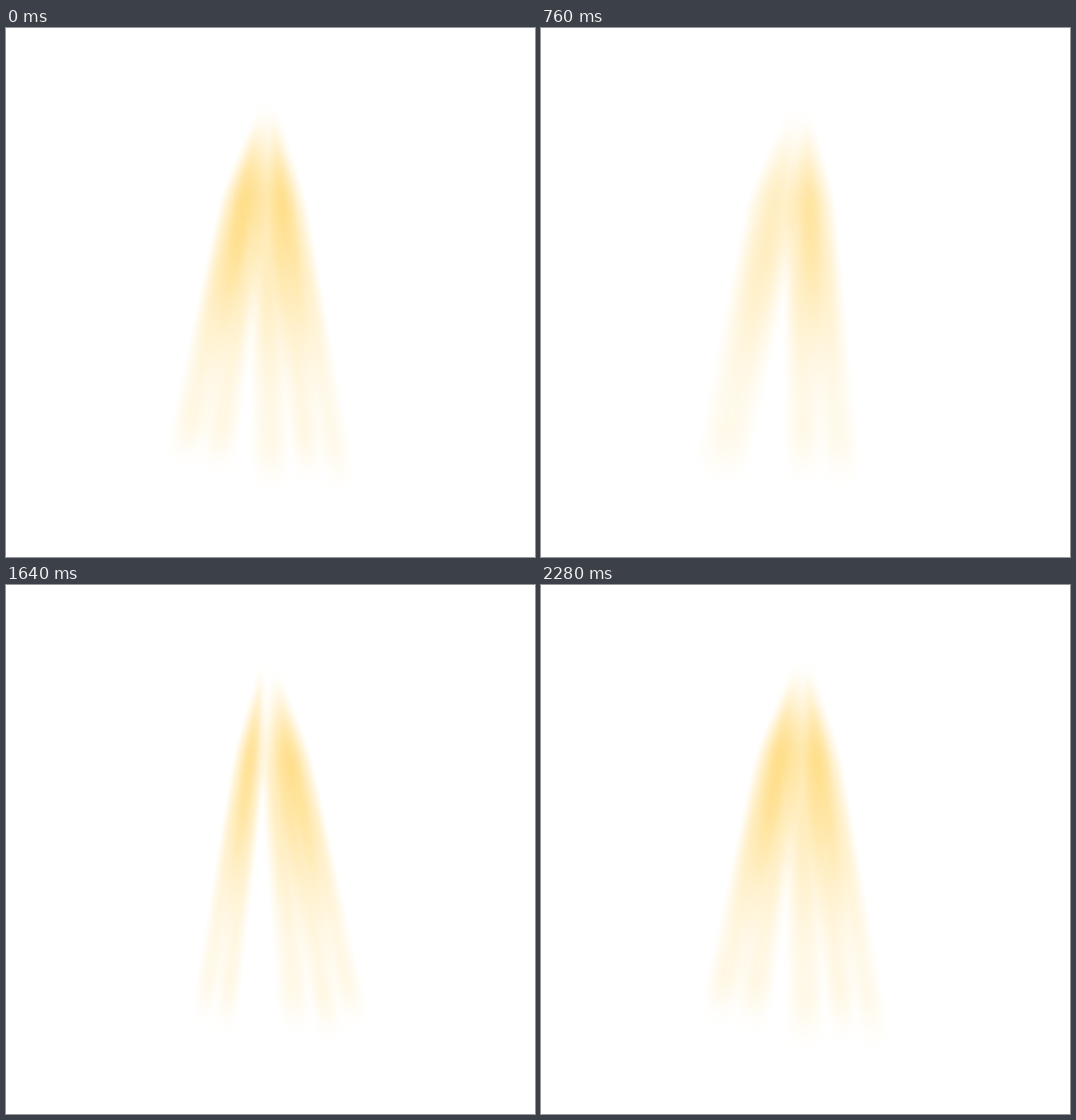
Animation of 748x748 px, one loop 2.32 s. Source, as an HTML page with a canvas:

```html
<!DOCTYPE html>
<html lang="en">
<head>
<meta charset="utf-8">
<title>Light rays</title>
<style>
html, body { margin: 0; width: 100%; height: 100%; overflow: hidden; background: #fff; }
canvas { display: block; width: 100vw; height: 100vh; }
</style>
</head>
<body>
<canvas id="stage" width="748" height="748"></canvas>
<script>
const ctx = document.getElementById('stage').getContext('2d');
const SIZE = 748, STEP = 40, LOOP = 2320, CYCLE = LOOP - STEP;
const APEX = { x: 370, y: 60 }, BASE = 600, DRIFT = 45;

const clamp = (v, lo, hi) => Math.min(hi, Math.max(lo, v));
const smooth = v => { v = clamp(v, 0, 1); return v * v * (3 - 2 * v); };
const noise = n => { const v = Math.sin(n * 12.9898) * 43758.5453; return v - Math.floor(v); };

// A fan is set by where its rays cross the base line; spacing gives their widths
function makeFan(at, ...bases) {
  const rays = bases.map((base, i) => {
    const gap = Math.min(...bases.filter((_, j) => j !== i).map(b => Math.abs(b - base)));
    return {
      slope: (base - APEX.x) / (BASE - APEX.y),
      width: clamp(gap * 1.2, 38, 84),
      top: 95 + 25 * noise(base),
      end: 625 + 45 * noise(base + 1),
      alpha: .32 + .12 * noise(base + 2)
    };
  });
  return { at, rays };
}

const fans = [
  makeFan(0, 252, 300, 374, 425, 465),
  makeFan(440, 324, 367, 418, 488),
  makeFan(760, 259, 372, 422),
  makeFan(1160, 262, 345, 383, 452),
  makeFan(1640, 280, 312, 408, 452, 490),
  makeFan(2040, 255, 300, 372, 430, 490)
];

// Soft streak: narrow at the top, bright upper body, faint long tail
function makeStreak(w, h) {
  const tile = document.createElement('canvas');
  tile.width = w;
  tile.height = h;
  const c = tile.getContext('2d'), img = c.createImageData(w, h);
  for (let y = 0, i = 0; y < h; y++) {
    const v = (y + .5) / h;
    const half = .35 + .65 * smooth(v / .3);
    const tail = 1 - .65 * smooth((v - .35) / .45);
    const along = smooth(v / .28) * tail * smooth((1 - v) / .16);
    for (let x = 0; x < w; x++, i += 4) {
      const u = ((x + .5) / w * 2 - 1) / half;
      const side = Math.max(0, 1 - u * u) ** 1.5;
      img.data.set([255, 202, 66, 255 * along * side], i);
    }
  }
  c.putImageData(img, 0, 0);
  return tile;
}

const streak = makeStreak(64, 512);

function drawRay({ slope, width, top, end, alpha }, shift, weight) {
  const y = Math.max(88, top + shift);
  const length = (Math.min(706, end + shift) - y) * Math.hypot(1, slope);
  ctx.save();
  ctx.translate(APEX.x + slope * (y - APEX.y), y);
  ctx.rotate(-Math.atan(slope));
  ctx.globalAlpha = alpha * weight;
  ctx.drawImage(streak, -width / 2, 0, width, length);
  ctx.restore();
}

// Phase runs from -1 (appearing) through 0 (full) to 1 (gone)
function drawFan({ rays }, phase) {
  const weight = Math.cos(phase * Math.PI / 2) ** 2;
  for (const ray of rays) drawRay(ray, phase * DRIFT, weight);
}

function render(ms) {
  const t = Math.floor(ms % LOOP / STEP) * STEP % CYCLE;
  const i = fans.findLastIndex(f => f.at <= t);
  const from = fans[i], to = fans[(i + 1) % fans.length];
  const p = (t - from.at) / ((to.at || CYCLE) - from.at);
  ctx.fillStyle = '#fff';
  ctx.fillRect(0, 0, SIZE, SIZE);
  drawFan(from, p);
  if (p > 0) drawFan(to, p - 1);
}

const start = performance.now();
function tick() {
  render(performance.now() - start);
  requestAnimationFrame(tick);
}
tick();
</script>
</body>
</html>
```
